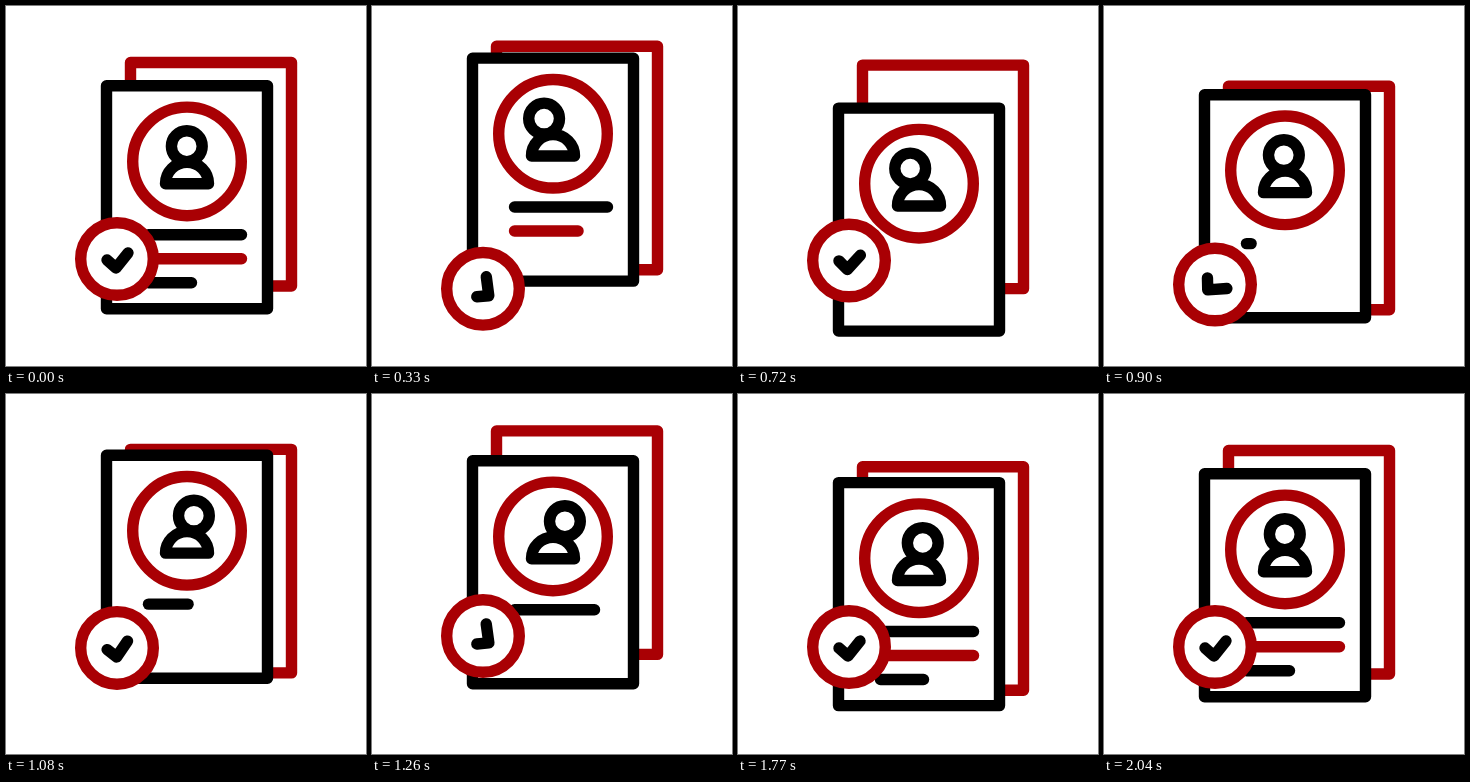
An HTML page that plays this animation: 360x360 px, repeating every 2070 ms.

```html
<!DOCTYPE html>
<html lang="en">
<head>
<meta charset="utf-8">
<title>Verified profile</title>
<style>
  html, body { margin: 0; width: 100%; height: 100%; overflow: hidden; background: #fff; }
  svg { display: block; width: 100vw; height: 100vh; }
  .ink, .red { fill: none; stroke: #000; stroke-width: 11.4; stroke-linecap: round; stroke-linejoin: round; }
  .red { stroke: #a90004; }
  .paper { fill: #fff; }
</style>
</head>
<body>
<svg viewBox="0 0 360 360">
  <rect id="back" class="red paper" x="124.5" y="56.5" width="161" height="223.5"/>
  <g id="front">
    <rect class="ink paper" x="100.5" y="79.8" width="161" height="223"/>
    <circle class="red" cx="181" cy="155.4" r="54.3"/>
    <circle id="head" class="ink" cx="180.8" cy="140.2" r="15.4"/>
    <path class="ink" d="M159.5 177.7a21.5 21.5 0 0 1 43 0z"/>
    <path id="line0" class="ink"/>
    <path id="line1" class="red"/>
    <path id="line2" class="ink"/>
  </g>
  <g id="badge">
    <circle class="red paper" cx="111" cy="253" r="36.3"/>
    <path id="check" class="ink" d="M101 254l9 8 12-15"/>
  </g>
</svg>
<script>
const LOOP = 2070, STEP = 30, BOB = 300, LAG = 125;
const $ = id => document.getElementById(id);

function ease(t, from, to) {
  const p = Math.min(1, Math.max(0, (t - from) / (to - from)));
  return p * p * (3 - 2 * p);
}

// Eases from rest through each turning point in order.
function glide(t, times, values) {
  return times.reduce((sum, time, i) =>
    sum + (values[i] - (values[i - 1] || 0)) * ease(t, times[i - 1] || 0, time), 0);
}

// Swings up and down with shrinking height, then settles.
function sway(t) {
  const turns = [380, 760, 1115, 1640];
  const heights = turns.map((_, i) => -29 * (-0.825) ** i);
  return glide(t, [...turns, 1915], [...heights, 0]);
}

function bob(t) {
  const heights = [31, -11.5, 25.5, -12.5, 2, 0];
  return glide(t, heights.map((_, i) => BOB * (i + 1)), heights);
}

function tilt(t) {
  return 47 * (-ease(t, 0, 360) + 2 * ease(t, 520, 900)
    - 2 * ease(t, 900, 1240) + ease(t, 1240, 1600));
}

function nod(t) {
  return 12.5 * (-ease(t, 0, 520) + 2 * ease(t, 520, 1320) - ease(t, 1320, 2040));
}

// Lines vanish from the bottom up and return from the top down.
function drawLine(t, i) {
  const gone = 410 - 170 * i;
  const [from, to] = [[823, 1394], [1250, 1500], [1440, 1700]][i];
  const shown = 1 - ease(t, gone, gone + 240) + ease(t, from, to);
  const length = (i < 2 ? 93 : 43) * shown;
  $('line' + i).setAttribute('d', shown > 0.001 ? `M142.5 ${228.7 + 24 * i}h${length}` : '');
}

function move(id, transform) {
  $(id).setAttribute('transform', transform);
}

function render(t) {
  move('front', `translate(0 ${sway(t)})`);
  move('back', `translate(0 ${sway(t - LAG)})`);
  move('badge', `translate(0 ${bob(t)})`);
  move('check', `rotate(${tilt(t)} 111 253)`);
  move('head', `translate(${nod(t)} 0)`);
  for (let i = 0; i < 3; i++) drawLine(t, i);
}

const start = performance.now();
function tick() {
  const t = (performance.now() - start) % LOOP;
  render(Math.floor(t / STEP) * STEP);
  requestAnimationFrame(tick);
}
render(0);
requestAnimationFrame(tick);
</script>
</body>
</html>
```
